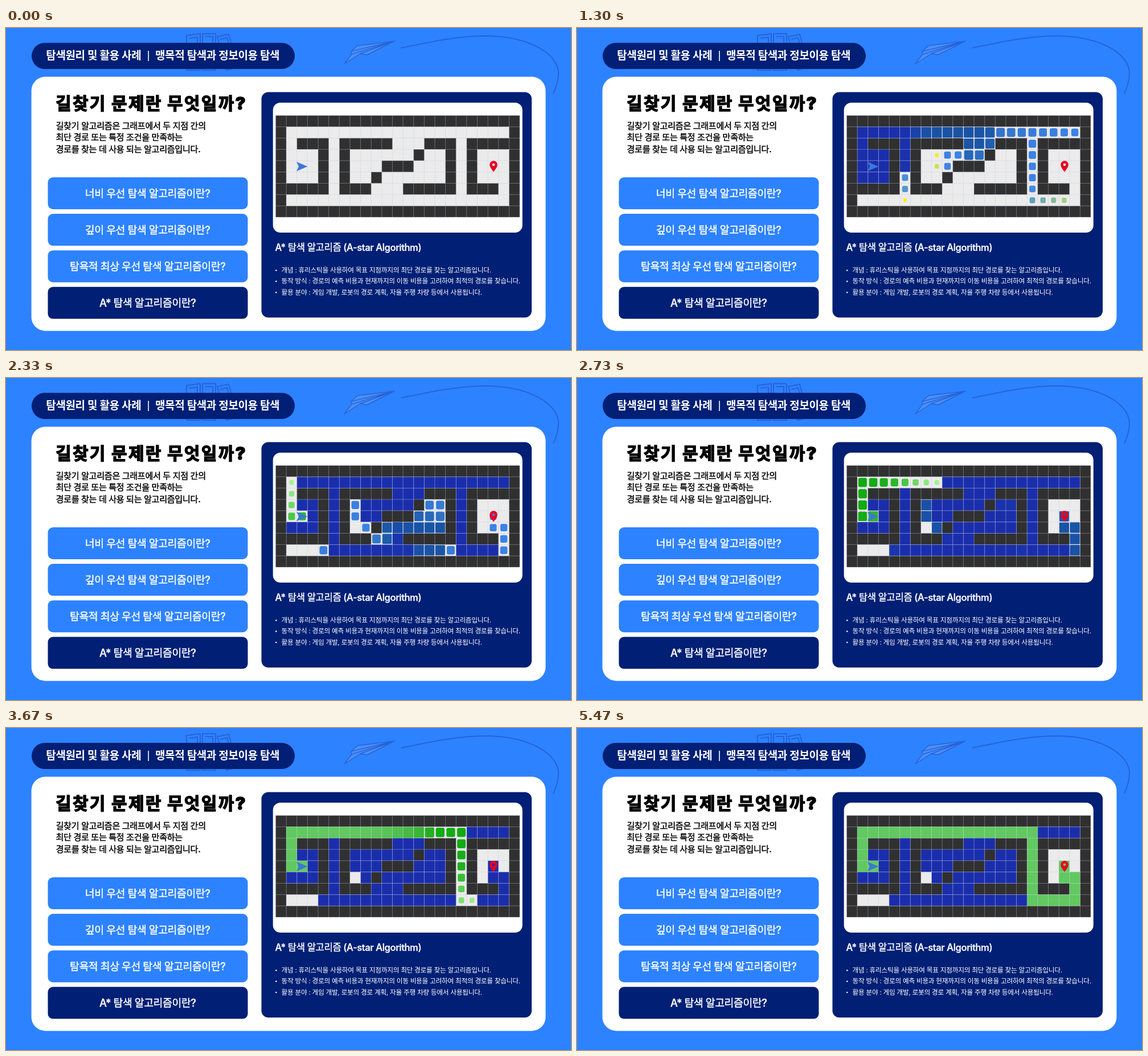
An HTML page that plays this animation: 992 px wide and 565 px high, repeating every 5530 ms.

```html
<!DOCTYPE html>
<html lang="ko">
<head>
<meta charset="utf-8">
<title>길찾기 알고리즘</title>
<style>
  html, body { margin: 0; width: 100%; height: 100%; overflow: hidden; background: #2d82ff; }
  svg { display: block; width: 992px; height: 565px; }
  text {
    font-family: Inter, "Noto Sans CJK KR", "Noto Sans CJK", sans-serif;
    letter-spacing: -.022em; fill: #fff; white-space: pre;
  }
  .head { font-size: 19.05px; font-weight: 600; }
  .title { font-size: 30px; font-weight: 900; letter-spacing: 2.3px; fill: #000; stroke: #000; stroke-width: 1.4; }
  .body { font-size: 15.15px; font-weight: 500; fill: #000; stroke: #000; stroke-width: .4; }
  .button { font-size: 18.3px; font-weight: 500; text-anchor: middle; stroke: #fff; stroke-width: .4; }
  .name { font-size: 16.6px; font-weight: 500; stroke: #fff; stroke-width: .35; }
  .note { font-size: 11.67px; }
  .deco { fill: none; stroke: #2763d8; stroke-width: 2; stroke-linejoin: round; }
</style>
</head>
<body>
<svg id="stage" viewBox="0 0 992 565">
  <rect width="992" height="565" fill="#2d82ff"/>
  <g class="deco">
    <path d="M694 35C752 23 798 13 848 14C922 16 969 46 970 79C970 93 966 104 961 115"/>
    <path d="M317 74V13L341 10V74ZM322 18L336 16V26M345 74V10H368V74ZM350 15H363V26M371 15L391 11L407 69L387 74ZM376 20L388 17L391 27"/>
    <path d="M594 63L607 46L606 41L617 31L682 23L634 47L622 45ZM606 41L682 23L622 45M607 46L682 23" fill="#4a90fb" stroke-width="1.4"/>
  </g>
  <rect x="45" y="26" width="462" height="46" rx="23" fill="#001f75"/>
  <text class="head" x="70.3" y="55.3">탐색원리 및 활용 사례</text>
  <rect x="249.3" y="40" width="1.6" height="18" fill="#fff"/>
  <text class="head" x="262" y="55.3">맹목적 탐색과 정보이용 탐색</text>

  <rect x="44.6" y="85.6" width="902.8" height="445.8" rx="24" fill="#fff"/>
  <text class="title" x="87" y="143.3">길찾기 문제란 무엇일까?</text>
  <text class="body" x="87.5" y="177">길찾기 알고리즘은 그래프에서 두 지점 간의</text>
  <text class="body" x="87.5" y="197.3">최단 경로 또는 특정 조건을 만족하는</text>
  <text class="body" x="87.5" y="217.8">경로를 찾는 데 사용 되는 알고리즘입니다.</text>
  <g id="buttons"></g>

  <rect x="448.5" y="112.5" width="474.5" height="395.5" rx="12" fill="#001f75"/>
  <rect x="468.7" y="131" width="438" height="228" rx="13" fill="#fff"/>
  <g id="maze"></g>
  <path d="M510 234.8L529.5 243L510 251.2L514 243Z" fill="#3a78d8"/>
  <path d="M856 252.5C852 247 849.2 243.4 849.2 239.8A6.8 6.8 0 0 1 862.8 239.8C862.8 243.4 860 247 856 252.5ZM856 237.4A2.4 2.4 0 1 0 856 242.2A2.4 2.4 0 1 0 856 237.4Z" fill="#e60023" fill-rule="evenodd"/>

  <text class="name" x="472.5" y="390.9">A* 탐색 알고리즘 (A-star Algorithm)</text>
  <g id="notes"></g>
</svg>
<script>
const LOOP = 5530;
const LEFT = 473.5, TOP = 153.5, CELL_W = 18.63, CELL_H = 19.83, COLS = 23, ROWS = 9;

const WALLS = [
  "#######################",
  "#.....................#",
  "#.###.#####...###.#####",
  "#...#.#......#..#.#...#",
  "#...#.#...###...#.#...#",
  "#...#.#..#......#.#...#",
  "#####.###...#####.###.#",
  "#.....................#",
  "#######################"
];

// "col,row" cells and straight "from>to" runs, in the order they light up
const SEARCH = `2,4 3,4 2,3 2,5 3,3 3,5 1,4 1,3 1,5 1,2 1,1>5,1 5,2>5,4 6,1>12,1
  11,2 12,2 13,1 13,2 11,3 12,3 14,1>19,1 17,2 20,1 17,3 21,1 17,4 10,3 17,5 9,3 9,4
  17,6 5,5 5,6 17,7>20,7 8,4 8,3 5,7 6,7>12,7 11,6 11,5 12,5 13,7 13,5 14,7 14,5 15,5
  15,7 10,5 10,6 13,4 14,4 15,4 9,6 14,3 15,3 16,7 4,7 7,3 7,4 8,5 21,7 21,6 21,5 20,5 20,4`;
const ROUTE = "2,4 1,4>1,1 2,1>17,1 17,2>17,7 18,7>21,7 21,6 21,5 20,5 20,4";

const searchStart = i => 40 + 22.56 * i;
const routeStart = i => 2083 + 57 * i;

// [age in ms, width, colour]
const SEARCH_KEYS = [
  [0, 5.5, "#fff000"], [45, 6.5, "#f0f014"], [75, 8, "#b8d868"], [105, 8.8, "#88bf98"],
  [150, 9.8, "#62a2bc"], [200, 10.8, "#4a8cd8"], [270, 11.8, "#3c82e6"], [360, 12.5, "#3c82e6"],
  [470, 13.8, "#3a7edc"], [560, 15, "#3376cc"], [640, 16.6, "#1f5cac"], [690, 17.1, "#1a55a5"],
  [845, 17.8, "#1950a6"], [865, 18.63, "#1a34ac"], [1000, 18.63, "#1a2eac"]
];
const ROUTE_KEYS = [
  [0, 7.5, "#aaf59a"], [50, 8.6, "#98ee8c"], [105, 9.8, "#80e274"], [162, 11.2, "#5cd052"],
  [219, 12.8, "#38be34"], [290, 14, "#1cae1c"], [400, 15, "#12aa14"], [580, 15.4, "#14aa14"],
  [640, 16.8, "#2cb22a"], [700, 18.3, "#40b83e"], [760, 18.63, "#4cbe4a"], [880, 18.63, "#5cc65a"],
  [1050, 18.63, "#61c960"]
];

const byId = id => document.getElementById(id);
const add = (parent, tag, attrs, label = "") => {
  const node = document.createElementNS("http://www.w3.org/2000/svg", tag);
  setAll(node, attrs);
  node.textContent = label;
  return parent.appendChild(node);
};
function setAll(node, attrs) {
  for (const key in attrs) node.setAttribute(key, attrs[key]);
}

function expand(spec) {
  return spec.trim().split(/\s+/).flatMap(part => {
    const [from, to = from] = part.split(">").map(p => p.split(",").map(Number));
    const dx = to[0] - from[0], dy = to[1] - from[1];
    const steps = Math.max(Math.abs(dx), Math.abs(dy));
    return Array.from({ length: steps + 1 }, (_, k) =>
      [from[0] + Math.sign(dx) * k, from[1] + Math.sign(dy) * k]);
  });
}

const channels = hex => [1, 3, 5].map(i => parseInt(hex.slice(i, i + 2), 16));

function sample(keys, age) {
  const next = keys.findIndex(key => key[0] > age);
  if (next < 0) return { width: keys.at(-1)[1], fill: keys.at(-1)[2] };
  const [a, b] = [keys[next - 1], keys[next]];
  const mix = (from, to) => from + (to - from) * (age - a[0]) / (b[0] - a[0]);
  const end = channels(b[2]);
  const rgb = channels(a[2]).map((v, i) => Math.round(mix(v, end[i])));
  return { width: mix(a[1], b[1]), fill: `rgb(${rgb})` };
}

function buildPanels() {
  ["너비 우선 탐색 알고리즘이란?", "깊이 우선 탐색 알고리즘이란?",
   "탐욕적 최상 우선 탐색 알고리즘이란?", "A* 탐색 알고리즘이란?"].forEach((label, i) => {
    const y = 262 + 64.1 * i;
    add(byId("buttons"), "rect", { x: 73.5, y, width: 351, height: 56, rx: 9, fill: i === 3 ? "#001f75" : "#2d82ff" });
    add(byId("buttons"), "text", { class: "button", x: 248.7, y: y + 34.6 }, label);
  });
  ["개념 : 휴리스틱을 사용하여 목표 지점까지의 최단 경로를 찾는 알고리즘입니다.",
   "동작 방식 : 경로의 예측 비용과 현재까지의 이동 비용을 고려하여 최적의 경로를 찾습니다.",
   "활용 분야 : 게임 개발, 로봇의 경로 계획, 자율 주행 차량 등에서 사용됩니다."].forEach((label, i) => {
    const y = 429 + 19.4 * i;
    add(byId("notes"), "circle", { cx: 474.3, cy: y - 3.8, r: 1.3, fill: "#fff" });
    add(byId("notes"), "text", { class: "note", x: 483.5, y }, label);
  });
}

function buildMaze() {
  const maze = byId("maze"), width = CELL_W * COLS, height = CELL_H * ROWS;
  add(maze, "rect", { x: LEFT, y: TOP, width, height, fill: "#ebebeb" });
  let walls = "", lines = "";
  WALLS.forEach((row, r) => {
    for (const run of row.matchAll(/#+/g)) {
      const w = run[0].length * CELL_W;
      walls += `M${LEFT + run.index * CELL_W} ${TOP + r * CELL_H}h${w}v${CELL_H}h${-w}z`;
    }
  });
  add(maze, "path", { d: walls, fill: "#303030" });
  const cells = new Map();
  expand(SEARCH).forEach(([col, row], i) => cells.set(`${col},${row}`, {
    x: LEFT + (col + .5) * CELL_W, y: TOP + (row + .5) * CELL_H,
    search: searchStart(i), route: Infinity, node: add(maze, "rect", {})
  }));
  expand(ROUTE).forEach((pos, i) => cells.get(pos.join()).route = routeStart(i));
  for (let c = 0; c <= COLS; c++) lines += `M${LEFT + c * CELL_W} ${TOP}v${height}`;
  for (let r = 0; r <= ROWS; r++) lines += `M${LEFT} ${TOP + r * CELL_H}h${width}`;
  add(maze, "path", { d: lines, stroke: "#c3c8e6", "stroke-opacity": .5, "stroke-width": .8 });
  return [...cells.values()];
}

function drawCell(cell, time) {
  if (time < cell.search) return setAll(cell.node, { width: 0, height: 0 });
  const { width, fill } = time >= cell.route
    ? sample(ROUTE_KEYS, time - cell.route)
    : sample(SEARCH_KEYS, time - cell.search);
  const height = width * CELL_H / CELL_W;
  setAll(cell.node, {
    x: cell.x - width / 2, y: cell.y - height / 2, width, height, fill,
    rx: Math.max(0, Math.min(3, width * .3, (CELL_W - width) * .9))
  });
}

buildPanels();
const cells = buildMaze();
const began = performance.now();

function frame() {
  const time = (performance.now() - began) % LOOP;
  cells.forEach(cell => drawCell(cell, time));
  requestAnimationFrame(frame);
}
frame();
</script>
</body>
</html>
```
